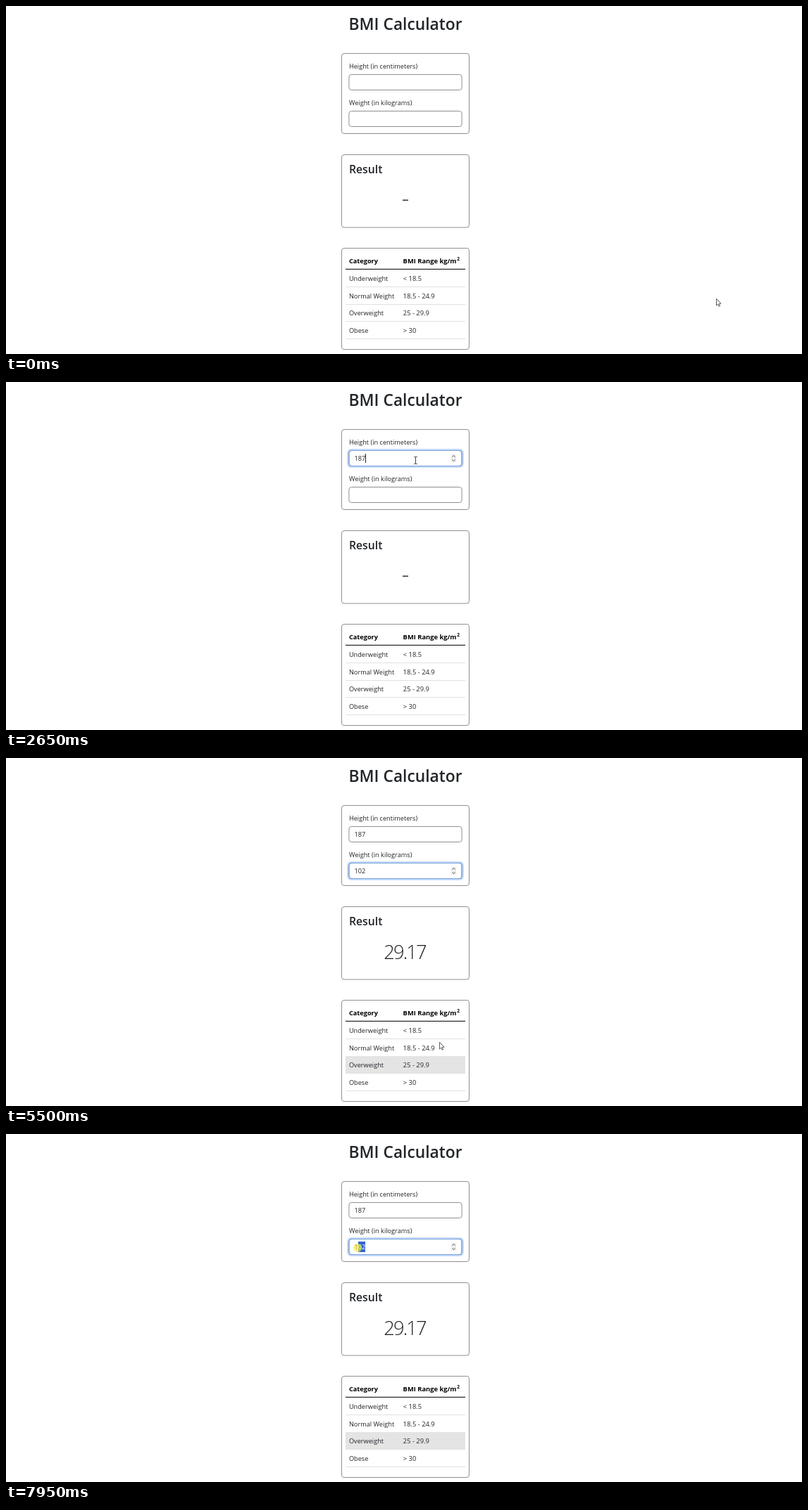
Write an HTML page with a canvas that moves like this. It is 1130 by 495 pixels and loops after 8000 ms.

```html
<!DOCTYPE html>
<html lang="en">
<head>
<meta charset="utf-8">
<title>BMI Calculator</title>
<style>
  html, body { margin: 0; width: 100%; height: 100%; overflow: hidden; background: #fff; }
  canvas { display: block; }
</style>
</head>
<body>
<canvas id="stage" width="1130" height="495"></canvas>
<script>
const ctx = document.getElementById('stage').getContext('2d');
const LOOP = 8000;
const INK = '#212529';
const FAMILY = '"Open Sans", "Noto Sans", sans-serif';
const BODY = 9.2;
const LEFT = 486.9;

const heightField = { y: 97.5, label: 'Height (in centimeters)', value: '187', typed: [2120, 2320, 2650], focus: [640, 3110] };
const weightField = { y: 149.5, label: 'Weight (in kilograms)', value: '102', typed: [4110, 4310, 4510], focus: [3110, Infinity] };
const fields = [heightField, weightField];

const categories = [
  ['Underweight', '< 18.5'],
  ['Normal Weight', '18.5 - 24.9'],
  ['Overweight', '25 - 29.9'],
  ['Obese', '> 30']
];

const caretOn = [[640, 1240], [1710, 3650], [4110, 5040], [5540, 6040], [6540, 7250]];
const FADE = 150;
const PRESS = 7250;

// Each move advances in discrete steps along a smooth path.
const moves = [
  { from: 70, to: 450, steps: 7, path: [[1008, 416], [960, 385], [740, 180], [603, 92], [581, 111]] },
  { from: 5250, to: 5500, steps: 4, path: [[581, 111], [590, 190], [615, 404]] },
  { from: 5567, to: 6050, steps: 9, path: [[615, 404], [617, 438], [603, 433], [600, 422]] },
  { from: 6150, to: 6660, steps: 9, path: [[600, 422], [572, 330], [520, 170], [506, 112], [514, 140], [526, 169]] },
  { from: 6920, to: 7550, steps: 10, path: [[526, 169], [515, 164], [511, 162], [507, 162], [503, 162]] },
  { from: 7880, to: 7950, steps: 2, path: [[503, 162], [501, 162], [499, 162]] }
];

const clamp = v => Math.max(0, Math.min(1, v));
const within = (t, [a, b]) => t >= a && t < b;

function spline(path, p) {
  const last = path.length - 1;
  const i = Math.min(last - 1, Math.floor(p * last));
  const u = p * last - i;
  const at = k => path[Math.max(0, Math.min(last, k))];
  return [0, 1].map(axis => {
    const [a, b, c, d] = [-1, 0, 1, 2].map(k => at(i + k)[axis]);
    return b + 0.5 * u * (c - a + u * (2 * a - 5 * b + 4 * c - d + u * (3 * (b - c) + d - a)));
  });
}

function pointerAt(t) {
  const move = moves.filter(m => t >= m.from).pop();
  if (!move) return moves[0].path[0];
  const step = Math.floor(clamp((t - move.from) / (move.to - move.from)) * (move.steps - 1) + 1e-6);
  return spline(move.path, (step + 1) / move.steps);
}

function text(str, x, y, { size = BODY, weight = 400, color = INK, align = 'left', spacing = 0 } = {}) {
  ctx.font = `${weight} ${size}px ${FAMILY}`;
  ctx.letterSpacing = spacing + 'px';
  ctx.textAlign = align;
  ctx.fillStyle = color;
  ctx.fillText(str, x, y);
}

function box(x, y, w, h, color = '#8f8f8f', lineWidth = 1, radius = 3.5) {
  ctx.beginPath();
  ctx.roundRect(x, y, w, h, radius);
  ctx.strokeStyle = color;
  ctx.lineWidth = lineWidth;
  ctx.stroke();
}

function fill(color, x, y, w, h) {
  ctx.fillStyle = color;
  ctx.fillRect(x, y, w, h);
}

function line(points, color, lineWidth) {
  ctx.beginPath();
  points.forEach(([x, y]) => ctx.lineTo(x, y));
  ctx.strokeStyle = color;
  ctx.lineWidth = lineWidth;
  ctx.stroke();
}

function spinner(y) {
  fill('#ededed', 632, y + 5.5, 7, 11);
  for (const dir of [-1, 1]) {
    const cy = y + 11 + dir * 2;
    line([[633.4, cy], [635.5, cy + dir * 2], [637.6, cy]], '#555', 1);
  }
}

const focusLevel = (t, [start, end]) =>
  t < start ? 0 : t < end ? clamp((t - start + 50) / FADE) : 1 - clamp((t - end + 10) / FADE);
const hovers = ([x, y], f) => x > 486 && x < 648 && y > f.y && y < f.y + 22;
const typedText = (t, f) => f.value.slice(0, f.typed.filter(k => t >= k).length);
const caretX = n => Math.round(495 + 5.1 * n);

function drawField(f, t, pointer) {
  const focused = within(t, f.focus);
  const glow = focusLevel(t, f.focus);
  const value = typedText(t, f);
  const base = f.y + 14.5;
  text(f.label, LEFT, f.y - 9);
  if (glow) box(485.6, f.y - 1, 162.8, 24, `rgba(13,110,253,${0.25 * glow})`, 3, 4.5);
  box(LEFT, f.y, 160.2, 22);
  if (glow) box(LEFT, f.y, 160.2, 22, `rgba(122,160,212,${glow})`);
  if (focused || hovers(pointer, f)) spinner(f.y);
  text(value, 494.6, base);

  if (f === weightField && t >= PRESS && pointer[0] < 508) {
    const left = caretX(pointer[0] < 502.5 ? 1 : 2);
    ctx.save();
    ctx.beginPath();
    ctx.rect(left, f.y + 3.5, 510 - left, 15);
    ctx.clip();
    fill('#3467cf', left, f.y + 3.5, 510 - left, 15);
    text(value, 494.6, base, { color: '#fff' });
    ctx.restore();
  }
  if (focused && caretOn.some(span => within(t, span)))
    fill('#222', caretX(value.length), f.y + 4.5, 1, 13);
}

function drawResult(bmi) {
  box(476.5, 211.5, 181, 103.5);
  text('Result', LEFT, 238, { size: 15.8, weight: 600 });
  if (bmi === null) return fill(INK, 563, 275.5, 8, 1.4);
  const label = bmi.toFixed(2);
  const spacing = label.includes('1') ? -1.9 : -0.6;
  text(label, 567 + spacing / 2, 285.5, { size: 27.4, weight: 300, align: 'center', spacing });
}

function drawTable(bmi) {
  box(476.5, 344.5, 181, 144);
  const active = bmi === null ? -1 : [18.5, 25, 30].filter(limit => bmi >= limit).length;
  const head = { weight: 700, color: '#000' };
  text('Category', LEFT, 365.5, head);
  text('BMI Range kg/m', 563.6, 365.5, { ...head, size: 9.35 });
  text('2', 640.3, 362.2, { ...head, size: 6.6 });
  categories.forEach(([name, range], i) => {
    const top = 375 + i * 24.7;
    if (i === active) fill('#e4e4e4', 482, Math.round(top), 170, 24.5);
    fill('#dee2e6', 482, Math.round(top + 24), 170, 1);
    text(name, LEFT, top + 15.8);
    text(range, 563.8, top + 15.8, { size: 9.35 });
  });
  fill('#212529', 482, 373.8, 170, 1.2);
}

function drawPointer([x, y], t) {
  const dragging = t >= PRESS;
  if (within(t, [640, 780]) || dragging) {
    ctx.beginPath();
    ctx.arc(x, y, 6, 0, Math.PI * 2);
    ctx.fillStyle = 'rgba(245,238,60,.65)';
    ctx.fill();
  }
  if (dragging) return;
  ctx.save();
  ctx.translate(x, y);
  if (fields.some(f => hovers([x, y], f))) {
    line([[0.5, -5], [0.5, 5.5]], '#444', 1);
    line([[-2, -4.5], [3, -4.5]], '#555', 0.9);
    line([[-2, 5.5], [3, 5.5]], '#555', 0.9);
  } else {
    ctx.beginPath();
    [[0.5, 0.3], [0.5, 10], [2.6, 8], [4.1, 11.3], [5.6, 10.6], [4.1, 7.5], [7, 7.2]]
      .forEach(([px, py]) => ctx.lineTo(px, py));
    ctx.closePath();
    ctx.fillStyle = '#fff';
    ctx.fill();
    ctx.strokeStyle = '#333';
    ctx.lineWidth = 0.8;
    ctx.stroke();
  }
  ctx.restore();
}

function render(t) {
  const pointer = pointerAt(t);
  const kilos = typedText(t, weightField);
  const bmi = kilos ? kilos / (heightField.value / 100) ** 2 : null;
  fill('#fff', 0, 0, 1130, 495);
  text('BMI Calculator', 567, 33.8, { size: 22.8, weight: 600, align: 'center' });
  box(476.5, 67.5, 181, 114);
  fields.forEach(f => drawField(f, t, pointer));
  drawResult(bmi);
  drawTable(bmi);
  drawPointer(pointer, t);
}

function tick() {
  render(performance.now() % LOOP);
  requestAnimationFrame(tick);
}
tick();
</script>
</body>
</html>
```
